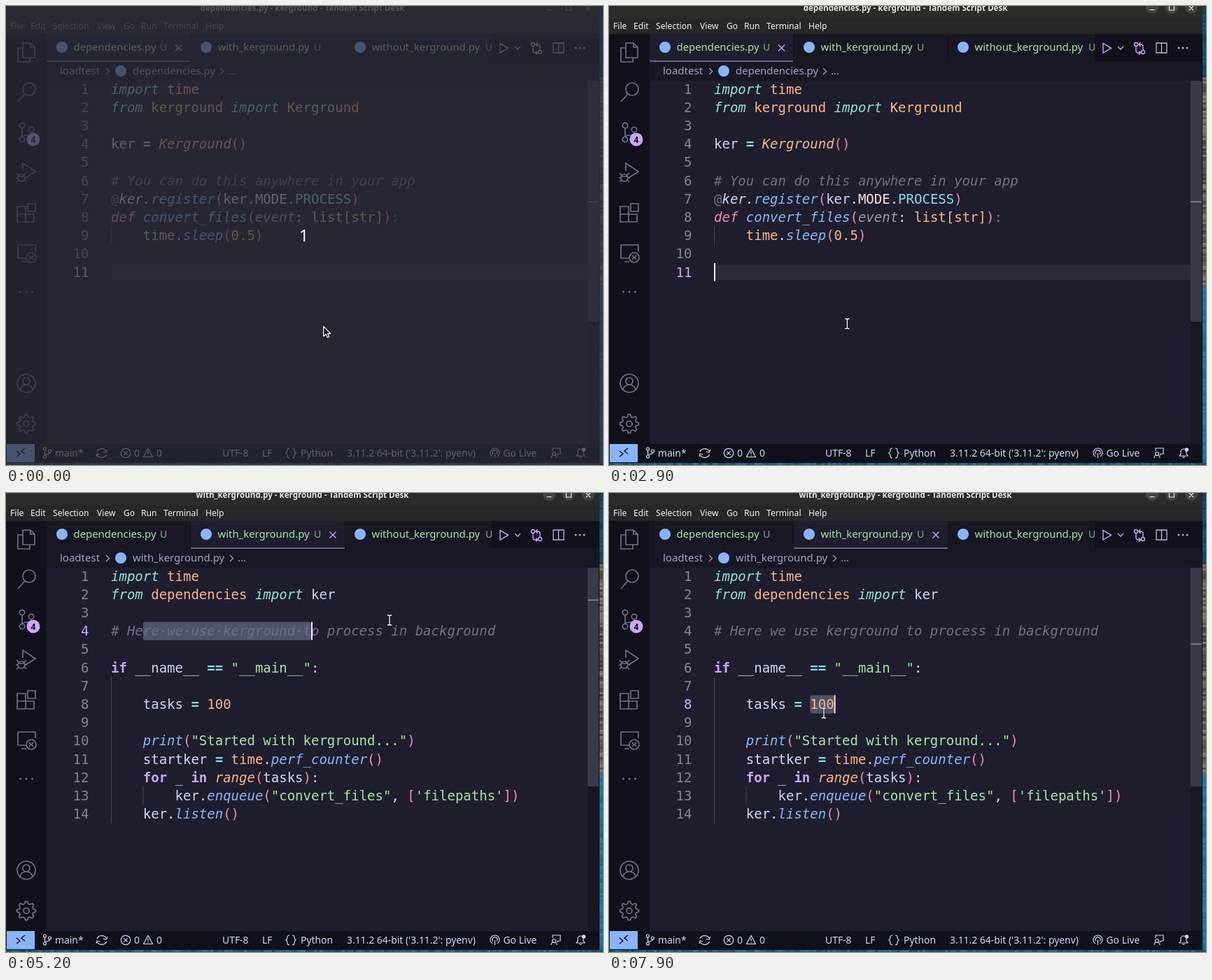
Write an HTML page with a canvas that moves like this. It is 853 by 657 pixels and loops after 8000 ms.

```html
<!DOCTYPE html>
<html lang="en">
<head>
<meta charset="utf-8">
<title>Editor walkthrough</title>
<style>
html, body { margin: 0; width: 100%; height: 100%; overflow: hidden; background: #11111b; }
canvas { display: block; }
</style>
</head>
<body>
<canvas id="stage" width="853" height="657"></canvas>
<script>
const ctx = document.getElementById('stage').getContext('2d');
const UI = '"Noto Sans", "Open Sans", sans-serif';
const MONO = '"DejaVu Sans Mono", monospace';
const CHAR = 11.44, LINE = 26.19, LEFT = 150;
const C = {
  text: '#cdd6f4', mauve: '#cba6f7', green: '#a6e3a1', blue: '#89b4fa', icon: '#6c7086',
  base: '#1e1e2e', mantle: '#181825', crust: '#11111b', dim: '#45475a'
};
// Token colours; an upper-case key means italic, "k" and "s" are bold.
const INK = {
  w: C.text, t: '#94e2d5', o: '#fab387', s: '#89dceb', p: '#89dceb', r: '#f38ba8', b: C.blue,
  g: C.green, c: '#6c7086', k: C.mauve, e: '#a097ae', l: '#f5e0dc'
};
const FILES = [
  ['Timport|w |otime', 'Tfrom|o kerground |Timport|o Kerground', '', 'wker |s=|w |OKerground|r()', '',
    'C# You can do this anywhere in your app',
    'c@|Wker.|Bregister|r(|wker.|lMODE.|pPROCESS|r)',
    'Rdef |Bconvert_files|r(|Eevent|w: |olist[str]|r)|c:',
    'w    |otime|w.|Bsleep|r(|o0.5|r)', '', ''],
  ['Timport|w |otime', 'Tfrom|o dependencies |Timport|w ker', '',
    'C# Here we use kerground to process in background', '',
    'kif|w __name__ |s==|w |g"__main__"|w:', '', 'w    tasks |s=|w |o100', '',
    'w    |Bprint|r(|g"Started with kerground..."|r)',
    'w    startker |s=|w |otime|w.|Bperf_counter|r()',
    'w    |kfor|w _ |kin|w |Orange|r(|wtasks|r)|w:',
    'w        ker.|Benqueue|r(|g"convert_files"|w, |r[|g\'filepaths\'|r])',
    'w    ker.|Blisten|r()']
];
const MOUSE = [ // time, x, y
  [0, 453, 458], [100, 453, 458], [900, 605, 241], [1100, 588, 249], [1200, 584, 250], [1700, 64, 251],
  [2000, 64, 251], [2500, 340, 478], [2800, 340, 478], [3500, 347, 58], [4200, 347, 58],
  [4900, 196, 197], [5000, 196, 197], [5200, 548, 182], [5300, 600, 188], [5600, 703, 198],
  [6000, 690, 205], [6700, 493, 281], [6900, 485, 284], [7500, 315, 298], [7800, 315, 298], [7900, 307, 315]
];

function mouseAt(t) {
  const i = MOUSE.findIndex(k => k[0] > t);
  if (i < 0) return MOUSE[MOUSE.length - 1].slice(1);
  const [a, b] = [MOUSE[i - 1], MOUSE[i]];
  let u = (t - a[0]) / (b[0] - a[0]);
  u = u * u * (3 - 2 * u);
  return [1, 2].map(n => a[n] + (b[n] - a[n]) * u);
}

function editorState(t) {
  const column = lag => Math.round((mouseAt(t - lag)[0] - LEFT) / CHAR);
  const clamp = (v, lo, hi) => Math.max(lo, Math.min(hi, v));
  if (t < 1200) return { line: 11 };
  if (t < 2500) {
    const col = clamp(column(0), 0, 38);
    return { line: 6, sel: [col, 38], caret: col, since: Math.min(t, 1700) };
  }
  if (t < 4000) return { line: 11, caret: 0, since: 2500 };
  if (t < 5000) return { line: 14, caret: 16, since: 4000 };
  if (t < 6400) {
    const col = clamp(column(75), 4, 48);
    return { line: 4, sel: [4, col], caret: col, since: Math.min(t, 5700) };
  }
  if (t < 6800) return { line: 4, dots: [6, 48], plain: true };
  if (t < 7500) return { line: 7, caret: 0, since: 6800 };
  return { line: 8, sel: [12, 15], caret: 15, since: 7500 };
}

function rect(x, y, w, h, color, r = 0) {
  ctx.fillStyle = color;
  ctx.beginPath();
  ctx.roundRect(x, y, w, h, r);
  ctx.fill();
}
function label(s, x, y, size, color, weight = 400, align = 'left') {
  ctx.font = `${weight} ${size}px ${UI}`;
  ctx.textAlign = align;
  ctx.fillStyle = color;
  ctx.fillText(s, x, y);
}
function stroke(d, color, width = 1.3) {
  ctx.strokeStyle = color;
  ctx.lineWidth = width;
  ctx.stroke(new Path2D(d));
}
const ring = (x, y, r) => `M${x - r} ${y}a${r} ${r} 0 1 0 ${2 * r} 0a${r} ${r} 0 1 0 ${-2 * r} 0`;
const cross = (x, y, r) => `M${x - r} ${y - r}l${2 * r} ${2 * r}m0 ${-2 * r}l${-2 * r} ${2 * r}`;
const disc = (x, y, r, color) => rect(x - r, y - r, 2 * r, 2 * r, color, r);
function ellipsis(x, y, gap, color) {
  for (const i of [-1, 0, 1]) disc(x + i * gap, y, 1.5, color);
}

function desktop() {
  for (let y = 0; y < 657; y += 3) {
    const n = Math.abs(Math.sin(y * 12.99) * 43758.5) % 1;
    const rock = y > 100 && y < 402;
    rect(848, y, 5, 3, rock ? `hsl(35 12% ${22 + 26 * n}%)` : `hsl(200 65% ${(y < 100 ? 19 : 32) + 9 * n}%)`);
  }
  for (let x = 0; x < 853; x += 4) {
    const n = Math.abs(Math.sin(x * 7.31) * 24634.6) % 1;
    rect(x, 654, 4, 3, `hsl(198 55% ${24 + 14 * n}%)`);
  }
}

function windowTop(t) {
  const focus = t >= 1200, grey = !focus || (t >= 6400 && t < 6800);
  rect(0, 0, 848, 18, '#2b2b2b');
  rect(0, 18, 848, 22, '#272727');
  const name = t < 3800 ? 'dependencies.py' : 'with_kerground.py';
  label(name + ' - kerground - Tandem Script Desk', 423.5, 7, 11.6, focus ? '#e4e4e4' : '#b5b5b5', 700, 'center');
  const ink = focus ? '#eeeeee' : '#a0a0a0';
  if (focus) for (const x of [776, 804, 832]) disc(x, 2, 9, '#444');
  stroke('M772.5 5.5h7M800.5-1v7h7v-7' + cross(832, 3, 3), ink, 1.2);
  const menu = { File: 6, Edit: 35, Selection: 67, View: 130, Go: 168, Run: 193, Terminal: 225, Help: 285 };
  for (const k in menu) label(k, menu[k], 33, 12.1, grey ? '#8f8f8f' : '#f0f0f0');
}

function activityBar() {
  rect(1, 40, 57, 587, C.crust);
  let gear = '';
  for (let i = 0; i < 32; i++) {
    const a = (i - .5) * Math.PI / 16, r = i % 4 < 2 ? 13.5 : 10;
    gear += `${i ? 'L' : 'M'}${29 + r * Math.cos(a)} ${598 + r * Math.sin(a)}`;
  }
  stroke('M24 53h11l6 6v15h-17zM35 53v6h6M24 60h-7v20h17v-6' +
    ring(33, 119, 9) + 'M27 126L17 137' +
    ring(23, 171, 3.7) + ring(36, 177, 3.7) + ring(23, 191, 3.7) + 'M23 175v12M36 181q0 4-6 4q-7 0-7 3' +
    'M24 236V225L42 237L28 246' + ring(22, 246, 5) + 'M17 244h10M15 239l3 3M29 239l-3 3M14 246h3M27 246h3M15 252l3-3M29 252l-3-3' +
    'M16 287h12v11h12v11h-24zM16 298h12v11M31 283h11v11h-11z' +
    'M29 361H17V342H42V351M22 366h7' + ring(36, 360, 7) + 'M33 357l2.5 3l-2.5 3M39 357l-2.5 3l2.5 3' +
    ring(29, 540, 13) + ring(29, 537, 5) + 'M20 549q2-7 9-7t9 7' + gear + 'Z' + ring(29, 598, 4), C.icon, 1.7);
  ellipsis(29, 409, 8.5, C.icon);
  disc(39, 191, 9.5, C.mauve);
  label('4', 39, 195.5, 12, C.crust, 700, 'center');
}

function tabs(t, my) {
  const second = t >= 4000, hover = my < 80 && t >= 3400 && t < 4600;
  rect(58, 40, 789, 67, C.mantle);
  rect(second ? 264 : 58, 40, second ? 220 : 205, 40, C.base);
  rect(263, 40, 1, 40, C.crust);
  rect(484, 40, 1, 40, C.crust);
  rect(second ? 264 : 58, 78.5, second ? 220 : 205, 1, '#b9a8dd');
  const names = [['dependencies.py', 80, 220], ['with_kerground.py', 286, 440], ['without_kerground.py', 506, 685]];
  for (const [name, x, u] of names) {
    disc(x, 59, 8, C.blue);
    label(name, x + 16.5, 64, 14.9, C.green);
    label('U', u, 64, 14, '#7fae80', 500);
  }
  if (!second) stroke(cross(246.5, 60, 4.5), C.mauve);
  if (second || hover) stroke(cross(467, 60, 4.5), second ? C.mauve : '#7f849c');
  if (hover) rect(58, 77, 601, 3, C.dim);
  rect(694, 40, 153, 39, C.crust);
  stroke('M706 53.5v13.5l11.5-6.7z' + ring(753, 55, 2.5) + ring(763, 66, 2.5) +
    'M753 58v6q0 3 3 3h3M757 64.5l2.5 2.5l-2.5 2.5M763 63v-5q0-3-3-3h-3M759.5 52l-2.5 3l2.5 3', C.mauve, 1.4);
  stroke('M727 58l4 4l4-4M782 53h15v14h-15zM789.5 53v14', '#bfb4de');
  ellipsis(820, 60, 6, '#a6adc8');

  const crumb = second ? 'with_kerground.py' : 'dependencies.py', end = second ? 319 : 305;
  label('loadtest', 77, 98, 15, '#9ca3bf');
  disc(164, 93, 8, C.blue);
  label(crumb, 181, 98, 14.9, '#9ca3bf');
  label('…', end + 12, 98, 15, '#9ca3bf');
  stroke(`M143 89l4.5 4.5l-4.5 4.5M${end + 1} 89l4.5 4.5l-4.5 4.5`, '#9ca3bf');
}

function editor(t, my) {
  const file = +(t >= 4000), lines = FILES[file], st = editorState(t);
  const top = n => 237 + (n - 6) * LINE;
  const at = col => LEFT + col * CHAR;
  if (st.sel) {
    rect(at(st.sel[0]), top(st.line), (st.sel[1] - st.sel[0]) * CHAR, 26.2, '#50546a', 3);
  } else if (!st.plain) rect(151, top(st.line) + 2.5, 680, 21.5, '#2a2b3c');
  if (file) {
    rect(150, top(7), 1, 8 * LINE, C.dim);
    rect(195.5, top(13), 1, LINE, C.dim);
  } else rect(150, top(9), 1, LINE, C.dim);

  lines.forEach((source, i) => {
    const n = i + 1, y = Math.round(top(n) + 19.6);
    ctx.font = `19px ${MONO}`;
    ctx.textAlign = 'right';
    ctx.fillStyle = n === st.line ? C.mauve : n === 11 && !file ? C.dim : '#7f849c';
    ctx.fillText(n, 118.5, y);
    ctx.textAlign = 'left';
    let col = 0;
    const dots = n === st.line && (st.sel || st.dots);
    for (const token of source ? source.split('|') : []) {
      const key = token[0], s = token.slice(1), low = key.toLowerCase();
      ctx.font = `${key !== low ? 'italic ' : ''}${/[ks]/.test(key) ? 'bold ' : ''}19px ${MONO}`;
      ctx.fillStyle = INK[low];
      ctx.fillText(s, at(col), y);
      for (const ch of s) {
        if (dots && ch === ' ' && col >= dots[0] && col < dots[1]) disc(at(col + .5), y - 6.5, 1.4, '#777c92');
        col++;
      }
    }
  });
  if (st.caret !== undefined && (t - st.since) % 1000 < 500) rect(at(st.caret), top(st.line), 2, 26, '#f5e8e4');

  const bottom = file ? 420 : 452;
  rect(831, 107, 16, 520, C.mantle);
  rect(831, 107, 16, bottom - 107, my < 107 ? '#202030' : '#383a49');
  rect(831, file ? 152.5 + (st.line - 4) * 15.75 : 279.5 - (11 - st.line) * 17.4, 16, 1.5, '#8b8ea2');
}

function statusBar() {
  rect(1, 627, 846, 27, C.crust);
  rect(1, 627, 40, 26, C.blue);
  stroke('M15 637l5 4l-5 4M27 633l-5 4l5 4', C.crust, 1.5);
  const items = { 'main*': 70, 'UTF-8': 309, LF: 366, Python: 421, "3.11.2 64-bit ('3.11.2': pyenv)": 487, 'Go Live': 710.5 };
  for (const k in items) label(k, items[k], 644.5, 13.9, C.text);
  label('0', 183, 644.5, 13.9, C.text);
  label('0', 215, 644.5, 13.9, C.text);
  stroke(ring(55.5, 634, 2) + ring(55.5, 645, 2) + ring(62.5, 637, 2) + 'M55.5 636v7M62.5 639q0 3-7 3' +
    'M130 638a7 6 0 0 1 13-1M143.5 642a7 6 0 0 1-13 1M145 635l-2 4l-4-1M129 645l1-4l4 1' +
    ring(171, 640, 6.7) + cross(171, 640, 2.7) + 'M203 633.5l6.5 12h-13zM203 637.5v4M203 643v1.2' +
    'M405 633q-3 0-3 3q0 3-2 4q2 1 2 4q0 3 3 3M409 633q3 0 3 3q0 3 2 4q-2 1-2 4q0 3-3 3' +
    'M695 645a6.5 6.5 0 1 1 7 0M696 641.5a3.4 3.4 0 1 1 5 0M698.5 640v7' +
    ring(783, 641, 2.5) + 'M779 647q0-4 4-4t4 4M781 637v-4h11v8h-3l-2 2' +
    'M815 644h12l-2-3v-3a4 4 0 0 0-8 0v3zM819.5 645q1.5 3 3 0', C.text, 1.2);
  disc(825.5, 635, 2.7, C.text);
}

function pointer(t, x, y) {
  ctx.save();
  ctx.translate(x, y);
  ctx.lineJoin = 'round';
  const shape = d => {
    ctx.fillStyle = '#161616';
    ctx.fill(new Path2D(d));
    stroke(d, '#fff', 1.2);
  };
  if (t < 300 || x < 125) shape('M.7.7v14l3.4-3l2.3 4.8l2.3-1l-2.2-4.7h4.3z');
  else if (y < 107) shape('M-1 .5q1.8-1.5 3 0v5l6 1.2q2 .6 1.5 3l-1 5.3h-8l-4-6q0-2 2.5-.5z');
  else {
    const beam = 'M-3-7h2l1 1l1-1h2M0-6v12M-3 7h2l1-1l1 1h2';
    stroke(beam, '#111', 3);
    stroke(beam, '#fff', 1.3);
  }
  ctx.restore();
}

function draw(t) {
  const [x, y] = mouseAt(t);
  rect(0, 0, 853, 657, C.crust);
  desktop();
  rect(58, 80, 789, 547, C.base);
  windowTop(t);
  activityBar();
  tabs(t, y);
  editor(t, y);
  statusBar();
  const veil = Math.max(0, t < 100 ? .7 : .7 * (1 - t / 400));
  rect(0, 0, 853, 657, `rgba(42, 44, 53, ${veil})`);
  if (t < 100) label('1', 425.5, 337, 24, '#f4f4f4', 500, 'center');
  pointer(t, x, y);
}

function tick() {
  draw(Math.floor(performance.now() % 8000 / 100) * 100);
  requestAnimationFrame(tick);
}
tick();
</script>
</body>
</html>
```
